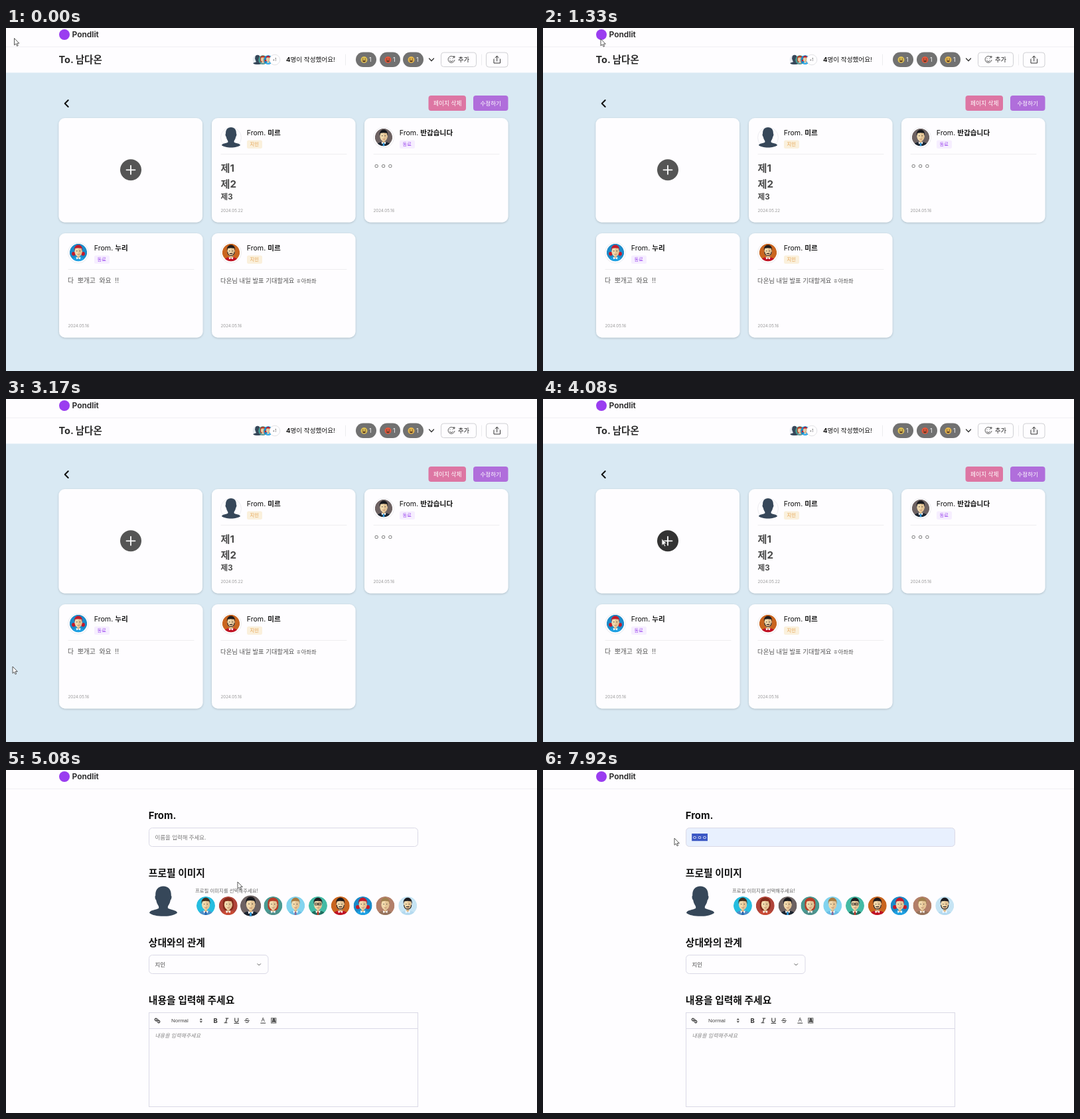
Recreate the animation shown at these times as an HTML page. Size 800x518 px, loop 8 s.

```html
<!DOCTYPE html>
<html lang="ko">
<head>
<meta charset="utf-8">
<title>Message board</title>
<style>
html, body { margin: 0; width: 100%; height: 100%; overflow: hidden; background: #fefdff; }
svg { display: block; width: 100%; height: 100%; font-family: Inter, "Noto Sans CJK KR", "Noto Sans CJK", sans-serif; }
</style>
</head>
<body>
<svg id="stage" viewBox="0 0 800 518"></svg>
<script>
const PAPER = '#fefdff';
const text = (x, y, size, str, fill = '#111', weight = 400, extra = '') =>
  `<text x="${x}" y="${y}" font-size="${size}" fill="${fill}" font-weight="${weight}" ${extra}>${str}</text>`;
const rect = (x, y, w, h, r, fill, extra = '') =>
  `<rect x="${x}" y="${y}" width="${w}" height="${h}" rx="${r}" fill="${fill}" ${extra}/>`;
const circle = (x, y, r, fill, extra = '') => `<circle cx="${x}" cy="${y}" r="${r}" fill="${fill}" ${extra}/>`;
const line = (d, stroke, width = 1) =>
  `<path d="${d}" fill="none" stroke="${stroke}" stroke-width="${width}" stroke-linecap="round" stroke-linejoin="round"/>`;
const shape = (d, fill) => `<path d="${d}" fill="${fill}"/>`;

// Avatars: background, hair, clothes, tie, feature
const people = [
  ['#25bde0', '#43301f', '#4f8fc8', '#2c62ab'],
  ['#b0443a', '#842a19', '#c84a35', '', 'long'],
  ['#6d6262', '#17181d', '#1c2430', '#2f9be0'],
  ['#489a92', '#b63d28', '#4f8f8b', '', 'long'],
  ['#82d4ef', '#a97c43', '#6dbfe6', '#8a6a9a'],
  ['#43baa4', '#201f22', '#1f6f60', '#c23b30', 'glasses'],
  ['#c9651f', '#211b1b', '#c01225', '', 'beard'],
  ['#1b8bc9', '#c21a2b', '#1ea0e2', '', 'tails'],
  ['#b37f69', '#a1804f', '#96735c', ''],
  ['#c6e4f4', '#1d1d22', '#b5daf0', '', 'beard']
];
const silhouette = shape('M0-23.5C8-23.5 12.5-18 12-9 13.5-8 12.5-3 11-2 10 4 7.5 6 7 8V10.5C12 13.5 20 13 21.5 17.5 14 24.5-14 24.5-21.5 17.5-20 13-12 13.5-7 10.5V8C-7.5 6-10 4-11-2-12.5-3-13.5-8-12-9-12.5-18-8-23.5 0-23.5Z', '#364759');

function portrait([bg, hair, clothes, tie, feature]) {
  let s = circle(0, 0, 14, bg);
  if (feature === 'long') s += rect(-8, -12, 16, 20, 7, hair);
  if (feature === 'tails') s += circle(-7.5, 2, 3, hair) + circle(7.5, 2, 3, hair);
  s += shape('M-11.5 15C-11 9-6 7.5 0 7.5S11 9 11.5 15Z', clothes) + rect(-2, 3, 4, 6, 1, '#d9b483');
  s += shape('M-3.6 7 0 9.4 3.6 7 3 11 0 9.6-3 11Z', '#fff');
  if (tie) s += shape('M-1 9H1L1.6 14H-1.6Z', tie);
  s += `<ellipse cy="-1.8" rx="6" ry="8" fill="#f1d9ac"/>` + shape('M0-9.8A6 8 0 0 1 0 6.2Z', '#e3c394');
  if (feature === 'beard') s += line('M-5.6-1C-4.8 7.2 4.8 7.2 5.6-1M-2 1.5H2', hair, 1.1);
  s += shape('M-6.3-2.5C-8.5-15.5 8.5-15.5 6.3-2.5L5.2-6.5Q0-8-5.2-6.5Z', hair);
  s += circle(-2.3, -2.4, .7, '#333') + circle(2.3, -2.4, .7, '#333');
  if (feature === 'glasses') s += `<path d="M-4.6-4H-.5V-1H-4.6ZM.5-4H4.6V-1H.5Z" fill="none" stroke="#222" stroke-width=".8"/>`;
  return s + line('M-1.5 3Q0 3.8 1.5 3', '#a85a48', .7);
}
const place = (x, y, scale, body, id = '') =>
  `<g id="${id}" transform="translate(${x} ${y}) scale(${scale})">${body}</g>`;
const avatar = (i, x, y, r, id) => place(x, y, r / 14, `<g clip-path="url(#round)">${portrait(people[i])}</g>`, id);

function emojiPill(x, color) {
  return rect(x, 36.5, 31, 22.5, 11.2, '#717171') + circle(x + 12.5, 48, 5, color)
    + circle(x + 10.7, 47, .8, '#4a3020') + circle(x + 14.3, 47, .8, '#4a3020')
    + shape(`M${x + 9.5} 49H${x + 15.5}Q${x + 12.5} 54 ${x + 9.5} 49Z`, '#5b3a25')
    + text(x + 20, 51, 8.6, '1', '#fff');
}

const cardBox = (x, y) => rect(x, y, 216.5, 157.5, 9, PAPER, 'filter="url(#shadow)"');
function card(x, y, name, relation, date, face, body) {
  const [ink, tint] = relation === '지인' ? ['#e5a04d', '#faf0dc'] : ['#9b45ee', '#f6eeff'];
  return cardBox(x, y) + circle(x + 29, y + 29.5, 15.5, PAPER, 'stroke="#ececf0"') + face
    + text(x + 52.7, y + 25.5, 10.65, `From. <tspan font-weight="700">${name}</tspan>`)
    + rect(x + 53, y + 33.5, 23, 12.5, 2.5, tint) + text(x + 57.5, y + 42.3, 7.3, relation, ink)
    + line(`M${x + 14} ${y + 54.5}H${x + 203}`, '#eeeef0')
    + body + text(x + 13.5, y + 141.5, 6.2, date, '#999');
}

const header = rect(0, 0, 800, 28, 0, PAPER) + circle(88, 10, 8, '#9a3df0')
  + text(99.5, 14.2, 12, 'Pondlit', '#222', 600) + line('M0 28.5H800', '#f0eff3');

const ink = '#4a4a4a';
const boardPage = rect(0, 67, 800, 451, 0, '#d9e9f3') + rect(0, 28, 800, 39.5, 0, PAPER)
  + text(79.5, 53, 14.5, 'To. 남다온', '#2b2b2b', 700)
  + place(379, 48, .31, circle(0, 0, 24, '#e8edf2') + silhouette)
  + avatar(3, 387, 48, 7) + avatar(7, 395, 48, 7)
  + circle(405, 48, 7.8, PAPER, 'stroke="#e3e3e6"') + text(401.5, 50, 5.5, '+1', '#555')
  + text(422, 51.2, 9.6, '<tspan font-weight="700">4</tspan>명이 작성했어요!')
  + line('M511.5 40V56M716.5 40V56', '#ececee')
  + emojiPill(527, '#d9bd55') + emojiPill(563, '#e1573d') + emojiPill(598, '#e2b44c')
  + line('M637.5 46 641 49.7 644.5 46', '#333', 1.3)
  + rect(655.5, 37, 53, 21.5, 4, PAPER, 'stroke="#d0d0d4"')
  + line('M675 44.3A5 5 0 1 0 676 48.5M669 46.2V46.4M673 46.2V46.4M668.5 49.5Q671 52.2 673.5 49.5M675 42.2V45.2M673.5 43.7H676.5', '#444', .9)
  + text(681, 51, 9.2, '추가')
  + rect(723.5, 37, 32.5, 22, 4, PAPER, 'stroke="#d0d0d4"')
  + line('M735 47V53H744.5V47M739.7 50V42.5M737 45 739.7 42.3 742.4 45', '#333', 1)
  + line('M93.7 109 88.7 114 93.7 119', '#111', 2)
  + rect(636.5, 102, 56.5, 23, 4, '#dd76a3') + text(644, 117, 8.7, '페이지 삭제', '#fff')
  + rect(704, 102, 52.5, 23, 4, '#b06edb') + text(714.5, 117, 8.5, '수정하기', '#fff')
  + cardBox(79.5, 136) + circle(188, 214.3, 16, '#555', 'id="add"') + line('M181.5 214.3H194.5M188 207.8V220.8', '#fff', 1.8)
  + card(310, 136, '미르', '지인', '2024.05.22', place(339, 165.5, .66, silhouette),
      text(323.5, 217.3, 15.2, '제1', ink, 700) + text(323.5, 240.5, 15.2, '제2', ink, 700) + text(323.5, 258.8, 11.6, '제3', ink, 700))
  + card(540, 136, '반갑습니다', '동료', '2024.05.16', avatar(2, 569, 165, 13.2), text(554, 211.5, 9, 'ㅇ ㅇ ㅇ', '#555', 400, 'word-spacing="-.4"'))
  + card(80, 310, '누리', '동료', '2024.05.16', avatar(7, 109, 339, 13.2), text(93, 385, 9.8, '다 뽀개고 와요 !!', '#555', 400, 'word-spacing="3"'))
  + card(310, 310, '미르', '지인', '2024.05.16', avatar(6, 339, 339, 13.2),
      text(323, 385, 9.4, '다온님 내일 발표 기대할게요 <tspan font-size="8.3">ㅎ아좌좌</tspan>', '#555'));

const border = 'stroke="#dad9e6"';
const heading = (y, str) => text(214.8, y, 14.8, str, '#111', 700);
const formPage = heading(74, 'From.') + rect(215.5, 87.5, 405, 28, 5, PAPER, border + ' id="field"')
  + text(224.5, 104.8, 8.45, '이름을 입력해 주세요.', '#777', 400, 'id="hint"')
  + '<g id="entry">' + [0, 1, 2].map(i => rect(224.2 + i * 7.9, 96, 8, 11.2, 0, '#3b57c4') + text(224.7 + i * 7.5, 104.8, 8.1, 'ㅇ', '#333')).join('') + '</g>'
  + heading(161, '프로필 이미지') + place(237, 198.5, .98, silhouette)
  + text(285, 184.5, 7.4, '프로필 이미지를 선택해주세요!', '#666')
  + people.map((_, i) => avatar(i, 301 + i * 33.8, 205, 14, 'pick' + i)).join('')
  + heading(266, '상대와의 관계') + rect(215.5, 279.5, 179.5, 28, 5, PAPER, border)
  + text(224.5, 296.6, 8.4, '지인', '#444') + line('M379 292.7 381.3 295 383.6 292.7', '#555', 1)
  + heading(353, '내용을 입력해 주세요') + rect(215.5, 366.5, 405, 142, 0, PAPER, border) + line('M215.5 390.5H620.5', '#dad9e6')
  + line('M228 376.2 226.6 375.2A1.8 1.8 0 0 0 224.6 378L227 379.6M228.5 381 229.5 381.7A1.8 1.8 0 0 0 231.5 379L229 377.2M226.7 377.3 229.5 379.6', '#333', 1.2)
  + text(249, 381.3, 8, 'Normal', '#444', 400, 'font-family="Liberation Sans, Arial, sans-serif"')
  + shape('M291.7 377.5H295.9L293.8 375ZM291.7 379.3H295.9L293.8 381.8Z', '#444')
  + text(312.5, 382, 9.5, 'B', '#333', 700)
  + line('M331 375H335M329 381.8H333M333 375 331 381.8M344.8 374.7V378.3A2.5 2.5 0 0 0 349.8 378.3V374.7M344 382.5H350.6', '#333', 1.1)
  + text(360.3, 381.7, 9, 'S', '#333') + line('M359.5 378.5H366.5', '#333', .8)
  + text(384.5, 380.3, 8, 'A', '#333') + line('M383.8 382.2H390.8', '#333', 1)
  + rect(399.5, 374.7, 7.5, 7.5, 0, '#bbb', 'stroke="#555" stroke-width=".7"') + text(400.7, 381.3, 7.5, 'A', '#222', 700)
  + text(224.5, 404.2, 8, '내용을 입력해주세요', '#888', 400, 'font-style="italic"');

stage.innerHTML = `<defs>
  <clipPath id="round"><circle r="14"/></clipPath>
  <filter id="shadow" x="-5%" y="-5%" width="110%" height="115%"><feDropShadow dx="0" dy="1" stdDeviation="1.6" flood-opacity=".2"/></filter>
</defs>${rect(0, 0, 800, 518, 0, PAPER)}<g id="board">${boardPage}</g><g id="form">${formPage}</g>${header}
<path id="pointer" d="M0 0V10.3L2.4 8.2 4.1 11.8 5.7 11 4.1 7.6H7.3Z" fill="#fff" stroke="#444" stroke-width=".9"/>`;

// Pointer stops: time, x, y
const route = [
  [0, 12.5, 15.5], [900, 13, 15.5], [1300, 87, 16.5], [1700, 87, 17], [2400, 90, 190], [3080, 10, 404],
  [3250, 10, 404], [3950, 179, 211], [4250, 179, 211], [4700, 310, 236], [4920, 366, 208], [5080, 349, 169],
  [5500, 300, 102], [5750, 300, 102], [6080, 316, 132], [6250, 316, 132], [6800, 254, 103], [6950, 254, 103], [7420, 198, 103], [8000, 198, 103]
];
const LOOP = 8000, STEP = LOOP / 96;
const clamp = (v, lo, hi) => Math.min(hi, Math.max(lo, v));
const el = id => document.getElementById(id);

function pointerAt(t) {
  const i = route.findIndex(stop => stop[0] > t);
  const [t0, x0, y0] = route[i - 1], [t1, x1, y1] = route[i];
  const u = (t - t0) / (t1 - t0), k = u * u * (3 - 2 * u);
  return [x0 + (x1 - x0) * k, y0 + (y1 - y0) * k];
}

function draw(t) {
  const [x, y] = pointerAt(t);
  const onForm = t > 4160, filled = t > 6070;
  el('pointer').setAttribute('transform', `translate(${x} ${y})`);
  el('board').style.display = onForm ? 'none' : '';
  el('form').style.display = onForm ? '' : 'none';
  el('add').setAttribute('fill', Math.hypot(x - 188, y - 214.3) < 16 ? '#333' : '#555');

  const hover = clamp(Math.min((t - 4800) / 150, (5240 - t) / 150), 0, 1);
  el('pick2').setAttribute('transform', `translate(368.6 205) scale(${1 + .12 * hover})`);

  el('field').setAttribute('fill', filled ? '#e8f0fe' : PAPER);
  el('hint').style.display = filled ? 'none' : '';
  el('entry').style.display = filled ? '' : 'none';
  const selected = t > 6950 ? clamp(Math.round((248 - x) / 7.9), 0, 3) : 0;
  [...el('entry').children].forEach((node, i) => {
    const active = (i >> 1) >= 3 - selected;
    if (i % 2) node.setAttribute('fill', active ? '#fff' : '#333');
    else node.style.display = active ? '' : 'none';
  });
}

const start = performance.now();
function tick() {
  const t = (performance.now() - start) % LOOP;
  draw(Math.min(Math.floor((t + 4) / STEP) * STEP, LOOP - STEP));
  requestAnimationFrame(tick);
}
tick();
</script>
</body>
</html>
```
